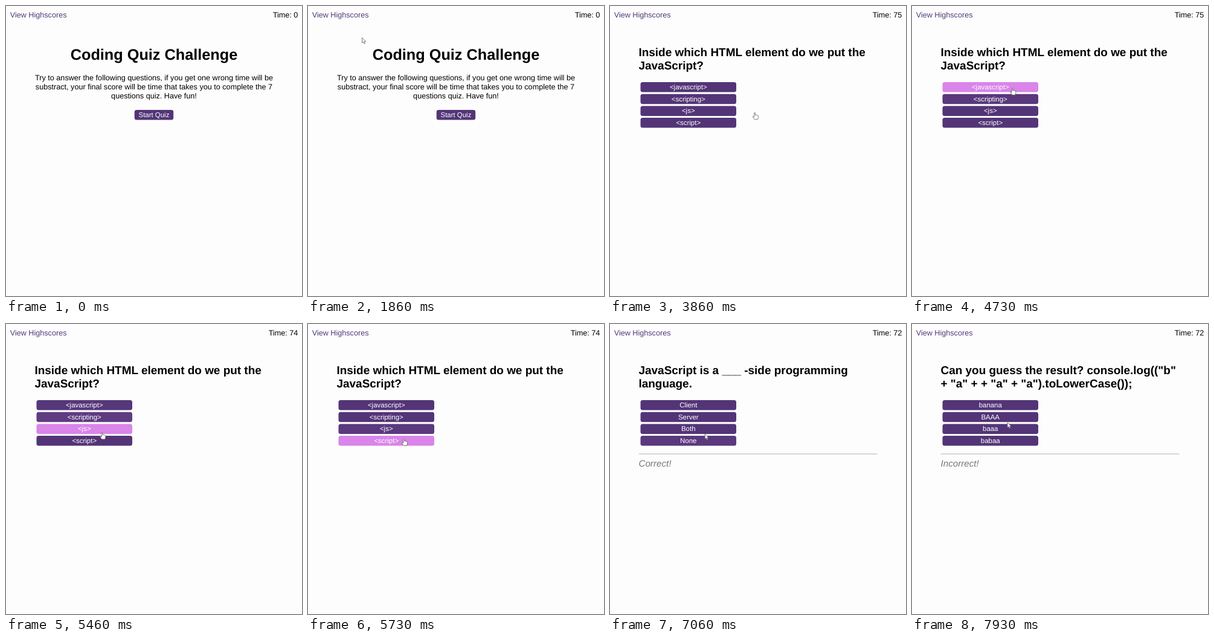
These frames come from a looping animation (490x480 px, 8 s). An HTML page:

```html
<!DOCTYPE html>
<html lang="en">
<head>
<meta charset="utf-8">
<title>Coding Quiz Challenge</title>
<style>
html, body { margin: 0; width: 100%; height: 100%; overflow: hidden; background: #fdfdfd; }
svg { display: block; width: 100%; height: 100%; }
text { font-family: "Liberation Sans", Arial, sans-serif; font-size: 12.64px; text-rendering: geometricPrecision; white-space: pre; }
.h1 { font-size: 25.28px; font-weight: bold; }
.h2 { font-size: 18.96px; font-weight: bold; }
.btn { font-size: 11.45px; fill: #fff; }
.note { font-size: 15.17px; font-style: italic; fill: #777; }
</style>
</head>
<body>
<svg id="stage" viewBox="0 0 490 480"></svg>
<script>
const LOOP = 8000, FPS = 15;
const PURPLE = [83, 53, 119], PINK = [232, 142, 246];
const stage = document.getElementById("stage");

function add(parent, tag, attrs, content) {
  const el = document.createElementNS("http://www.w3.org/2000/svg", tag);
  for (const key in attrs) el.setAttribute(key, attrs[key]);
  if (content !== undefined) el.textContent = content;
  parent.append(el);
  return el;
}
const label = (parent, x, y, str, cls = "", anchor = "start") =>
  add(parent, "text", { x, y, class: cls, "text-anchor": anchor }, str);

function button(parent, x, y, width, str) {
  const box = { x, y, width, height: 16.5 };
  const rect = add(parent, "rect", { ...box, rx: 3.5 });
  label(parent, x + width / 2, y + 12, str, "btn", "middle");
  return { rect, box };
}

function intro() {
  const g = add(stage, "g", {});
  label(g, 245, 89, "Coding Quiz Challenge", "h1", "middle");
  ["Try to answer the following questions, if you get one wrong time will be",
   "substract, your final score will be time that takes you to complete the 7",
   "questions quiz. Have fun!"].forEach((s, i) => label(g, 245, 123.2 + i * 14.8, s, "", "middle"));
  return { g, start: 0, buttons: [button(g, 212.7, 172, 64.5, "Start Quiz")] };
}

function quiz(start, lines, answers, note) {
  const g = add(stage, "g", {});
  lines.forEach((s, i) => label(g, 47.5, 83.3 + i * 22, s, "h2"));
  const buttons = answers.map((s, i) => button(g, 50.5, 126 + i * 19.7, 158.5, s));
  if (note) {
    add(g, "rect", { x: 47.5, y: 214.4, width: 395, height: 1.4, fill: "#c6cbc9" });
    label(g, 47.5, 235.7, note, "note");
  }
  return { g, start, buttons };
}

add(stage, "rect", { width: 490, height: 480, fill: "#fdfdfd" });
label(stage, 6.7, 18.5, "View Highscores").setAttribute("fill", "#533a7b");
const link = { x: 7, y: 8, width: 93, height: 14 };
const timer = label(stage, 483.4, 18.5, "", "", "end");

const screens = [
  intro(),
  quiz(3850, ["Inside which HTML element do we put the", "JavaScript?"],
       ["<javascript>", "<scripting>", "<js>", "<script>"]),
  quiz(6060, ["JavaScript is a ___ -side programming", "language."],
       ["Client", "Server", "Both", "None"], "Correct!"),
  quiz(7770, ['Can you guess the result? console.log(("b"', '+ "a" + + "a" + "a").toLowerCase());'],
       ["banana", "BAAA", "baaa", "babaa"], "Incorrect!")
];

// pointer moves; each begins where the one before ended
const ENTRY = { x: 300, y: 244 };
const moves = [
  { from: 660, to: 1130, x: 215, y: 150 },
  { from: 1330, to: 2130, x: 85, y: 49 },
  { from: 2200, to: 2600, x: 78, y: 14 },
  { from: 3330, to: 3860, x: 239.5, y: 176 },
  { from: 4260, to: 5060, x: 160.5, y: 132.5 },
  { from: 5130, to: 5930, x: 158.5, y: 190.4 },
  { from: 6660, to: 7460, x: 157, y: 180.8 },
  { from: 7600, to: 7930, x: 158, y: 163 }
];

const pointer = add(stage, "g", { stroke: "#555", "stroke-width": .75, fill: "#fff", "stroke-linejoin": "round" });
const arrow = add(pointer, "path", { d: "M0 0V8.6L2 6.8L3.4 9.9L4.8 9.2L3.5 6.2H6Z" });
const hand = add(pointer, "path", {
  d: "M-.8 .8Q0-.5 .9 .8V4.4L2.2 4.2L3.6 4.6L5 5Q6 5.2 6 6.4V8.4L5 11.7H-.3L-3 7.6Q-3.6 6.2-2.2 6.5L-.8 7.7Z"
});

const show = (el, on) => el.setAttribute("display", on ? "inline" : "none");
const easeOut = p => 1 - (1 - p) ** 3;
const inside = (p, b) => p.x >= b.x && p.x <= b.x + b.width && p.y >= b.y && p.y <= b.y + b.height;
const lastMove = t => moves.findLastIndex(m => t >= m.from);

function position(t) {
  const i = lastMove(t);
  if (i < 0) return ENTRY;
  const a = moves[i - 1] || ENTRY, b = moves[i];
  const e = easeOut(Math.min(1, (t - b.from) / (b.to - b.from)));
  return { x: a.x + (b.x - a.x) * e, y: a.y + (b.y - a.y) * e };
}

// a new screen ignores the pointer until the next move begins
function hasMoved(t, screen) {
  const i = lastMove(t);
  return i >= 0 && moves[i].from >= screen.start;
}

// each frame the hover colour covers about half of what is left
function glow(frame, screen, box) {
  let k = 0;
  for (let f = Math.ceil(screen.start * FPS / 1000); f <= frame; f++) {
    const t = f * 1000 / FPS;
    const over = hasMoved(t, screen) && inside(position(t), box);
    k += (over - k) * .53;
  }
  return k;
}

const mix = k => `rgb(${PURPLE.map((c, i) => Math.round(c + (PINK[i] - c) * k))})`;

function render(ms) {
  const frame = Math.floor((ms + 7) * FPS / 1000), t = frame * 1000 / FPS;
  const now = screens.findLastIndex(s => t >= s.start), screen = screens[now];
  screens.forEach(s => show(s.g, s === screen));
  for (const { rect, box } of screen.buttons) rect.setAttribute("fill", mix(glow(frame, screen, box)));
  timer.textContent = "Time: " + (now ? 75 - Math.max(0, Math.floor((t + 1) / 1000) - 4) : 0);

  const p = position(t);
  const felt = now && !hasMoved(t, screen) ? screens[now - 1] : screen;
  const isHand = inside(p, link) || felt.buttons.some(b => inside(p, b.box));
  show(pointer, t >= moves[0].from);
  show(hand, isHand);
  show(arrow, !isHand);
  pointer.setAttribute("transform", `translate(${p.x} ${p.y})`);
}

const begin = performance.now();
function tick() {
  render((performance.now() - begin) % LOOP);
  requestAnimationFrame(tick);
}
tick();
</script>
</body>
</html>
```
